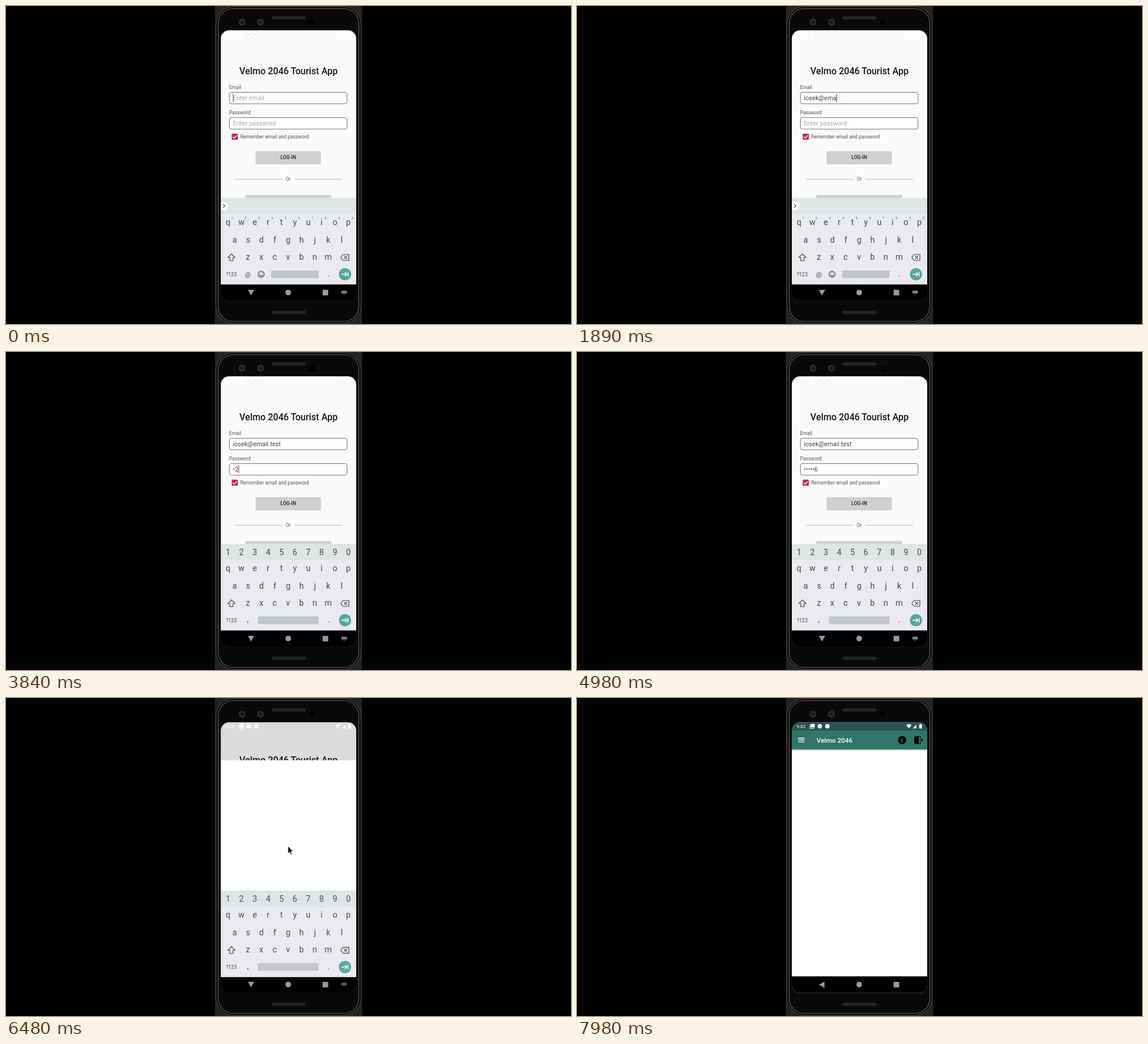
An HTML page that plays this animation: 960x540 px, repeating every 8000 ms.

```html
<!DOCTYPE html>
<html lang="en">
<head>
<meta charset="utf-8">
<title>Log-in demo</title>
<style>
html, body { margin: 0; width: 100%; height: 100%; overflow: hidden; background: #000; }
svg { display: block; width: 100vw; height: 100vh; font-family: Roboto, sans-serif; }
.label { font-size: 8.3px; fill: #555; }
.input { font-size: 10.6px; fill: #444; }
.hint { fill: #aaa; }
.field { fill: #fff; stroke: #777; stroke-width: 1; }
.key { font-size: 14px; fill: #4c4c4c; text-anchor: middle; }
.tiny { font-size: 5.2px; fill: #666; text-anchor: middle; }
.line { fill: none; stroke: #4c4c4c; stroke-width: 1.2; }

#reveal, #login, #dim, #keyboard, #back, #imeIcon, #pointer { animation: 8s linear infinite; }
#reveal { animation-name: reveal; }
#login { animation-name: leave; }
#dim { animation-name: dim; }
#keyboard { animation-name: drop; }
#back { animation-name: turn; transform-origin: 416px 486.5px; }
#imeIcon { animation-name: vanish; }
#pointer { animation-name: point; }

@keyframes reveal {
  0% { transform: translateY(460px); }
  79.3125% { transform: translateY(460px); animation-timing-function: cubic-bezier(.3, 0, .8, .15); }
  80.2% { transform: translateY(276px); animation-timing-function: cubic-bezier(.05, .7, .1, 1); }
  84.625%, 100% { transform: none; }
}
@keyframes leave {
  0%, 79.3125% { transform: none; }
  81%, 100% { transform: translateY(-5.5px); }
}
@keyframes dim {
  0%, 79.3125% { opacity: 0; }
  80.5%, 100% { opacity: .125; }
}
@keyframes drop {
  0% { transform: none; opacity: 1; }
  80.7% { transform: none; opacity: 1; animation-timing-function: cubic-bezier(.4, 0, 1, 1); }
  83.2%, 100% { transform: translateY(46px); opacity: 0; }
}
@keyframes turn {
  0%, 81.2% { transform: none; }
  83.7%, 100% { transform: rotate(90deg); }
}
@keyframes vanish {
  0%, 80.7% { opacity: 1; }
  81.7%, 100% { opacity: 0; }
}
@keyframes point {
  0%, 71.24% { opacity: 0; }
  71.25%, 87.5% { opacity: 1; }
  87.51%, 100% { opacity: 0; }
}
</style>
</head>
<body>
<svg viewBox="0 0 960 540">
  <defs>
    <clipPath id="screen"><rect x="365" y="41.3" width="230" height="459.5" rx="14"/></clipPath>
    <clipPath id="sheetClip"><rect id="reveal" x="365" y="41" width="230" height="460"/></clipPath>
    <linearGradient id="shade" x2="0" y2="1">
      <stop stop-opacity=".3"/><stop offset="1" stop-opacity="0"/>
    </linearGradient>
  </defs>

  <rect width="960" height="540"/>
  <rect x="355" width="250" height="540" fill="#232323"/>
  <rect x="357" y="1.5" width="246" height="537" rx="28" fill="#050505" stroke="#444" stroke-width="1.2"/>
  <rect x="360.5" y="4.5" width="239" height="531" rx="25" fill="#0a0a0a" stroke="#626262" stroke-width="1.2"/>
  <g fill="#242424">
    <rect x="451" y="17.3" width="58" height="5.6" rx="2"/>
    <rect x="451" y="517.3" width="58" height="5.6" rx="2"/>
  </g>
  <g fill="#2a2a2a"><circle cx="401" cy="27.5" r="6"/><circle cx="432.5" cy="27.5" r="6"/></g>
  <g fill="#151515"><circle cx="401" cy="27.5" r="2.5"/><circle cx="432.5" cy="27.5" r="2.5"/></g>
  <circle cx="520" cy="27.5" r="4.5" fill="#020202"/>

  <g clip-path="url(#screen)">
    <rect x="365" y="41" width="230" height="460" fill="#fafafa"/>
    <g id="login">
      <text x="480" y="116" font-size="15.6" font-weight="500" fill="#161616" text-anchor="middle">Velmo 2046 Tourist App</text>
      <text class="label" x="379" y="141">Email</text>
      <rect class="field" x="379.5" y="146.5" width="200" height="19.5" rx="3.5"/>
      <text class="input" id="email" x="385.5" y="160.3"></text>
      <text class="label" x="379" y="184">Password</text>
      <rect class="field" x="379.5" y="189.5" width="200" height="19.5" rx="3.5"/>
      <text class="input" id="password" x="385.5" y="203.3"></text>
      <rect id="caret" width="1.2" height="14" fill="#c2385a"/>
      <rect x="383.5" y="216.7" width="10.4" height="10.4" rx="1.2" fill="#b52f50"/>
      <path d="M385.5 222l2.4 2.4 4.4-4.8" fill="none" stroke="#fff" stroke-width="1.4"/>
      <text class="label" x="398" y="225">Remember email and password</text>
      <rect x="424" y="247" width="111" height="22.3" rx="1.5" fill="#000" opacity=".13"/>
      <rect x="424.5" y="246.5" width="110" height="21.5" rx="1" fill="#d0d0d0"/>
      <text x="479.5" y="260.2" font-size="8.3" font-weight="500" fill="#222" text-anchor="middle">LOG-IN</text>
      <path d="M389 294.3h80.5M490 294.3h81" stroke="#c8c8c8" stroke-width="1.2"/>
      <text class="label" x="479.5" y="297.2" text-anchor="middle">Or</text>
      <rect x="406.5" y="321" width="146" height="22" rx="1" fill="#d0d0d0"/>
    </g>
    <rect id="dim" x="365" y="41" width="230" height="460"/>

    <g clip-path="url(#sheetClip)">
      <rect x="365" y="41" width="230" height="432" fill="#fff"/>
      <rect x="365" y="87.4" width="230" height="2.4" fill="url(#shade)"/>
      <rect x="365" y="41" width="230" height="14" fill="#2a544c"/>
      <rect x="365" y="55" width="230" height="32.4" fill="#307567"/>
      <path d="M375.5 68h11M375.5 71.3h11M375.5 74.6h11" stroke="#fff" stroke-width="1.4"/>
      <text x="407" y="76" font-size="11.4" font-weight="500" fill="#fff">Velmo 2046</text>
      <circle cx="552.3" cy="71.5" r="7"/>
      <text x="552.3" y="75.5" font-family="Noto Serif, serif" font-size="11" font-weight="700" font-style="italic" fill="#307567" text-anchor="middle">i</text>
      <path d="M573 65.5l7.5-1v14l-7.5-1z"/>
      <path d="M580 65.5h3.5v3M583.5 74.5v3H580M581.5 71.5h5M584.7 69.2l2.3 2.3-2.3 2.3" fill="none" stroke="#000" stroke-width="1.1"/>
    </g>

    <g fill="#fff">
      <text x="373" y="51" font-size="8">9:02</text>
      <path d="M397 44h7v6h-7zM395.4 45.5h1v5.8h6.6v1h-7.6z"/>
      <circle cx="412.5" cy="48" r="3.8"/><circle cx="425.5" cy="48" r="3.8"/>
      <path d="M559.5 46q4.5-3.6 9 0l-4.5 5.6zM570.5 51.6l6-6v6zM581.5 45h1.3v-1h2v1h1.3v6.7h-4.6z"/>
    </g>
    <path d="M410.5 48h4M423.5 48h4" stroke="#000" stroke-opacity=".25"/>

    <rect x="365" y="472.6" width="230" height="29"/>
    <g id="keyboard">
      <rect x="365" y="326" width="230" height="147" fill="#e9e9ee"/>
      <rect x="365" y="326" width="230" height="27" fill="#dfe5e4"/>
      <rect x="365" y="472.8" width="230" height="29"/>
      <g id="letters"></g>
      <path class="line" d="M383 421l6 6h-3.2v5.5h-5.6V427H377z"/>
      <path class="line" d="M568.8 427l3.8-5h10v10h-10zM574.5 424.4l5.2 5.2M579.7 424.4l-5.2 5.2"/>
      <text x="382.7" y="458.6" font-size="8.6" fill="#4c4c4c" text-anchor="middle">?123</text>
      <text class="key" x="547.5" y="459">.</text>
      <circle cx="576" cy="455.5" r="10.5" fill="#55a899"/>
      <path d="M570 455.5h9M576 452.3l3.2 3.2-3.2 3.2M581.3 451.5v8" fill="none" stroke="#fff" stroke-width="1.4"/>
      <g id="emailKeys">
        <circle cx="370" cy="339.5" r="7.6" fill="#fff"/>
        <path class="line" d="M368.7 336.4l3.1 3.1-3.1 3.1"/>
        <text id="suggestion" x="479" y="344" font-size="10.6" fill="#6c7070" text-anchor="middle"></text>
        <text class="key" x="411" y="459.5" style="font-size:11px">@</text>
        <circle class="line" cx="433.5" cy="455.5" r="5.2"/>
        <path class="line" d="M430.7 456.6q2.8 3.4 5.6 0M431.6 452.8v1.5M435.4 452.8v1.5"/>
        <rect x="450.5" y="449" width="80.5" height="13" rx="1.5" fill="#c3c6cc"/>
      </g>
      <g id="passKeys">
        <text class="key" x="411" y="459">,</text>
        <rect x="428" y="449" width="103" height="13" rx="1.5" fill="#c3c6cc"/>
      </g>
    </g>

    <g fill="#999">
      <path id="back" d="M411 482h10.6l-5.3 9.4z"/>
      <circle cx="479.5" cy="486.5" r="4.8"/>
      <rect x="538" y="482" width="9.4" height="9.4"/>
      <g id="imeIcon">
        <rect x="570" y="483.5" width="9" height="4.6" rx=".6"/>
        <path d="M571 485h7M571 486.7h7" stroke="#222" stroke-width=".7" stroke-dasharray="1 .7"/>
        <path d="M573 489h3l-1.5 1.6z"/>
      </g>
    </g>
  </g>

  <path id="pointer" d="M479 251.2v13.2l3-2.8 2.1 4.7 2-1-2.1-4.4h4z" stroke="#fff" stroke-width=".9"/>
</svg>
<script>
const LOOP = 8000, BLINK = 500, PITCH = 22.72;
const $ = id => document.getElementById(id);
const address = 'iosek@email.test', secret = '123456';

const emailTimes = [870, 960, 1050, 1200, 1380,
  ...Array.from({ length: 11 }, (_, i) => 1650 + i * 75)];
const passTimes = [3450, 3750, 3960, 4080, 4200, 4320];
const EMAIL_BLUR = 2580, PASS_FOCUS = 2700, UNMASK = 1500;

function addText(parent, cls, x, y, text) {
  const el = document.createElementNS('http://www.w3.org/2000/svg', 'text');
  el.setAttribute('class', cls);
  el.setAttribute('x', x);
  el.setAttribute('y', y);
  el.textContent = text;
  parent.append(el);
}
function addRow(chars, x, y, parent = $('letters'), cls = 'key') {
  [...chars].forEach((c, i) => addText(parent, cls, x + i * PITCH, y, c));
}
addRow('qwertyuiop', 377.2, 372);
addRow('asdfghjkl', 388.6, 401.5);
addRow('zxcvbnm', 411, 431);
addRow('1234567890', 384.2, 362, $('emailKeys'), 'tiny');
addRow('1234567890', 377.2, 345, $('passKeys'));

const show = (el, on) => el.setAttribute('visibility', on ? 'visible' : 'hidden');
const typed = (times, t) => times.filter(at => at <= t).length;

function fill(el, value, hint) {
  el.textContent = value || hint;
  el.classList.toggle('hint', !value);
}

function render(t) {
  const n = typed(emailTimes, t), p = typed(passTimes, t);
  const inPassword = t >= PASS_FOCUS;
  const composing = n > 0 && n < 6;
  const entry = address.slice(0, n);
  const plain = p && t < passTimes[p - 1] + UNMASK;
  const masked = plain ? '•'.repeat(p - 1) + secret[p - 1] : '•'.repeat(p);

  fill($('email'), entry, 'Enter email');
  fill($('password'), masked, 'Enter password');
  $('email').style.textDecoration = composing ? 'underline' : 'none';
  $('suggestion').textContent = composing ? entry : '';
  show($('emailKeys'), !inPassword);
  show($('passKeys'), inPassword);

  const active = inPassword ? $('password') : $('email');
  const count = inPassword ? p : n;
  const since = count ? (inPassword ? passTimes : emailTimes)[count - 1]
    : inPassword ? PASS_FOCUS : -280;
  const lit = Math.floor((t - since) / BLINK) % 2 === 0;
  const focused = t < EMAIL_BLUR || inPassword;
  const width = count ? active.getComputedTextLength() : 0;
  $('caret').setAttribute('x', 385.4 + width);
  $('caret').setAttribute('y', inPassword ? 192.3 : 149.3);
  show($('caret'), focused && lit);
}

function tick() {
  render(performance.now() % LOOP);
  requestAnimationFrame(tick);
}
tick();
</script>
</body>
</html>
```
